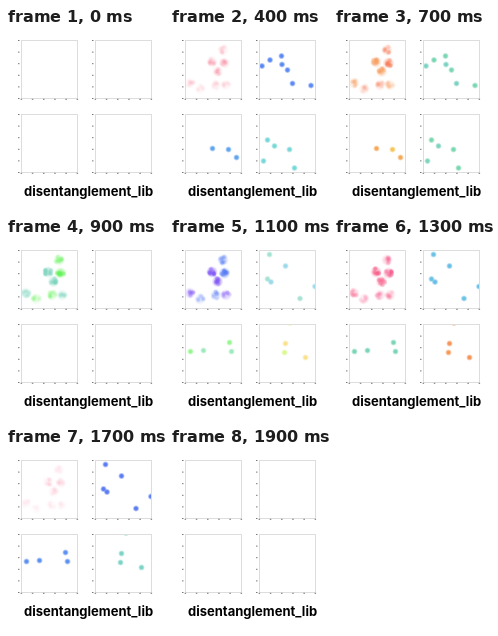
An HTML page with a canvas that plays this animation: 158x182 px, repeating every 2 s.

```html
<!DOCTYPE html>
<html lang="en">
<head>
<meta charset="utf-8">
<style>
  html, body { margin: 0; width: 100%; height: 100%; overflow: hidden; background: #fff; }
  canvas { position: absolute; left: 0; top: 0; width: 158px; height: 182px; }
  h1 {
    position: absolute; left: 18px; top: 154px; margin: 0; white-space: nowrap;
    font: 700 13px/18px Inter, sans-serif; color: #000;
  }
</style>
</head>
<body>
<canvas></canvas>
<h1>disentanglement_lib</h1>
<script>
const LOOP = 2000, STEP = 100, W = 56, H = 58;
const HUE_TIMES = [400, 700, 900, 1300, 1500];
const canvas = document.querySelector('canvas');
const ctx = canvas.getContext('2d');
const ratio = window.devicePixelRatio || 1;
canvas.width = 158 * ratio;
canvas.height = 182 * ratio;
ctx.scale(ratio, ratio);

// Each panel shows one set of points per half loop; the cloud keeps its places.
const cloud = [[53, 22], [42, 34], [54.5, 35], [47.5, 43.5], [30, 61], [20, 55], [46, 57], [56, 57]];
const panels = [
  { x: 15, y: 12, hues: [-12, 19, 140, 342, 345], soft: true, sets: [cloud, cloud] },
  { x: 89, y: 12, hues: [222, 163, 160, 198, 227], sets: [
    [[100, 32], [92, 38], [111.5, 28], [112, 36.5], [117.5, 42], [122.5, 55.5], [141, 57.5]],
    [[99.5, 16.5], [115.5, 28], [97.5, 41], [101, 44], [130, 60.5], [145, 48.5]]
  ] },
  { x: 15, y: 86, hues: [211, 36, 100, 161, 219], sets: [
    [[42.5, 120.5], [58.5, 121.5], [66.5, 129.5]],
    [[20.5, 113.5], [33.5, 112.5], [59.5, 104.5], [61.5, 113.5]]
  ] },
  { x: 89, y: 86, hues: [180, 160, 100, 24, 170], sets: [
    [[97.5, 112], [104.5, 118], [119.5, 121.5], [93.5, 133], [124.5, 140]],
    [[115.5, 105.5], [114.5, 114.5], [135.5, 119.5], [120, 85]]
  ] }
];

const bell = v => Math.exp(-v * v);
const arch = (t, start, end) =>
  Math.sin(Math.PI * Math.min(1, Math.max(0, (t - start) / (end - start))));

function random(seed) {
  const v = Math.sin(seed * 12.9898) * 43758.5453;
  return v - Math.floor(v);
}

function hueAt(hues, t) {
  const last = hues.length - 1;
  if (t <= HUE_TIMES[0]) return hues[0];
  if (t >= HUE_TIMES[last]) return hues[last];
  const i = HUE_TIMES.findIndex(time => time > t);
  const p = (t - HUE_TIMES[i - 1]) / (HUE_TIMES[i] - HUE_TIMES[i - 1]);
  return hues[i - 1] + (hues[i] - hues[i - 1]) * p;
}

function blob(x, y, r, hue, alpha) {
  const saturation = 90 - 40 * bell((hue - 168) / 35);
  const color = a => `hsla(${hue}, ${saturation}%, 64%, ${a})`;
  const fill = ctx.createRadialGradient(x, y, 0, x, y, r);
  fill.addColorStop(0, color(alpha));
  fill.addColorStop(.45, color(alpha * .9));
  fill.addColorStop(1, color(0));
  ctx.fillStyle = fill;
  ctx.fillRect(x - r, y - r, 2 * r, 2 * r);
}

// A mottled puff, thinner away from the middle of the cloud.
function puff(x, y, hue, alpha, seed) {
  const a = alpha * (1 - Math.abs(y - 37) / 34);
  blob(x, y, 6, hue, a * .6);
  for (let n = 0; n < 8; n++) {
    const angle = random(seed + n * 7) * 2 * Math.PI;
    const d = 3.6 * Math.sqrt(random(seed + n * 7 + .5));
    blob(x + d * Math.cos(angle), y + d * Math.sin(angle), 2.8, hue, a * .5);
  }
}

function drawPoints({ x, y, hues, soft, sets }, t) {
  const half = t < 1000 ? 0 : 1;
  const hue = hueAt(hues, t);
  const spread = 26 * bell((t - 950) / 200);
  const alpha = soft
    ? 1.1 * arch(t, 100, 1900) ** 2
    : 2 * (half ? arch(t, 1000, 1900) : arch(t, 100, 900));
  ctx.save();
  ctx.beginPath();
  ctx.rect(x, y, W + 1, H + 1);
  ctx.clip();
  sets[half].forEach(([px, py], i) => {
    const h = hue + (i % 2 ? spread : -spread), a = Math.min(1, alpha);
    if (soft) puff(px, py, h, a, i * 31 + t / STEP);
    else blob(px, py, 3.4, h, a);
  });
  ctx.restore();
}

function drawAxes({ x, y }) {
  ctx.strokeStyle = '#ddd';
  ctx.strokeRect(x + .5, y + .5, W, H);
  ctx.fillStyle = '#777';
  for (let i = 0; i < 6; i++) {
    ctx.fillRect(x - 3, y + i * H / 5, 1.5, 1);
    ctx.fillRect(x - .4 + i * W / 5, y + H + .8, 1.5, 1);
  }
}

function draw(now) {
  const t = Math.floor(now % LOOP / STEP) * STEP;
  ctx.fillStyle = '#fff';
  ctx.fillRect(0, 0, 158, 182);
  for (const panel of panels) {
    drawPoints(panel, t);
    drawAxes(panel);
  }
  requestAnimationFrame(draw);
}
requestAnimationFrame(draw);
</script>
</body>
</html>
```
